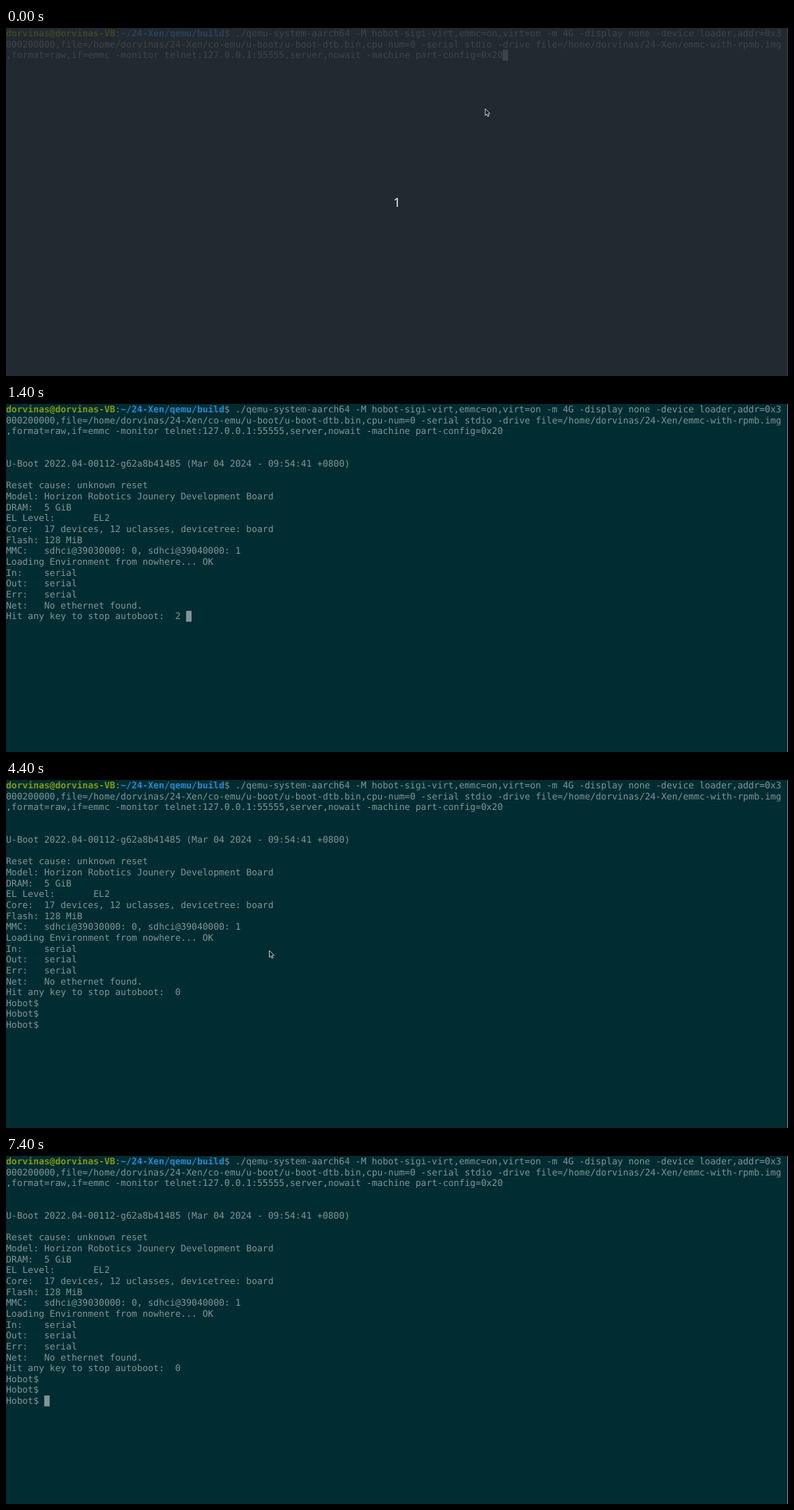
Write an HTML page with a canvas that moves like this. It is 1121 px wide and 500 px high and loops after 8000 ms.

```html
<!DOCTYPE html>
<html lang="en">
<head>
<meta charset="utf-8">
<title>Terminal boot</title>
<style>
html, body { margin: 0; width: 100%; height: 100%; overflow: hidden; background: #012d32; }
canvas { display: block; }
</style>
</head>
<body>
<canvas id="stage" width="1121" height="500"></canvas>
<script>
const ctx = document.getElementById('stage').getContext('2d');
const W = 1121, H = 500, LOOP = 8000;
const CELL = 7.824, ROW = 15.64, BASE = 12;
const BG = '#012d32', FG = '#839496', GREEN = '#859900', BLUE = '#268bd2';
const MONO = '13px "DejaVu Sans Mono", monospace';

const command = [
  [23, 0, ':'],
  [40, 0, '$ ./qemu-system-aarch64 -M hobot-sigi-virt,emmc=on,virt=on -m 4G -display none -device loader,addr=0x3'],
  [0, 1, '000200000,file=/home/dorvinas/24-Xen/co-emu/u-boot/u-boot-dtb.bin,cpu-num=0 -serial stdio -drive file=/home/dorvinas/24-Xen/emmc-with-rpmb.img'],
  [0, 2, ',format=raw,if=emmc -monitor telnet:127.0.0.1:55555,server,nowait -machine part-config=0x20']
];

// Output lines: time shown, column, row, text
const output = [
  [1200, 0, 5, 'U-Boot 2022.04-00112-g62a8b41485 (Mar 04 2024 - 09:54:41 +0800)'],
  [1200, 0, 7, 'Reset cause: unknown reset'],
  [1200, 0, 8, 'Model: Horizon Robotics Jounery Development Board'],
  [1200, 0, 9, 'DRAM:  5 GiB'],
  [1200, 0, 10, 'EL Level:       EL2'],
  [1200, 0, 11, 'Core:  17 devices, 12 uclasses, devicetree: board'],
  [1200, 0, 12, 'Flash:'],
  [1400, 7, 12, '128 MiB'],
  [1400, 0, 13, 'MMC:   sdhci@39030000: 0, sdhci@39040000: 1'],
  [1400, 0, 14, 'Loading Environment from nowhere... OK'],
  [1400, 0, 15, 'In:    serial'],
  [1400, 0, 16, 'Out:   serial'],
  [1400, 0, 17, 'Err:   serial'],
  [1400, 0, 18, 'Net:   No ethernet found.'],
  [1400, 0, 19, 'Hit any key to stop autoboot:'],
  [2100, 0, 20, 'Hobot$'],
  [2200, 0, 21, 'Hobot$'],
  [2200, 0, 22, 'Hobot$']
];

// Text cursor: start time, column, row (no column = hidden)
const cursor = [
  [0, 91, 2], [300], [900, 91, 2], [1100, 0, 3], [1200, 7, 12],
  [1400, 33, 19], [1600], [1900, 33, 19], [2100, 7, 20], [2200, 7, 22],
  [2800], [3500, 7, 22], [4400], [5500, 7, 22], [5600],
  [6200, 7, 22], [6800], [7400, 7, 22]
];

function print(col, row, str, color = FG, weight = '') {
  ctx.font = weight + MONO;
  ctx.fillStyle = color;
  ctx.fillText(str, col * CELL, row * ROW + BASE);
}

function drawCursor(t) {
  const [, col, row] = cursor.filter(c => c[0] <= t).pop();
  if (col === undefined) return;
  ctx.fillStyle = FG;
  ctx.fillRect(col * CELL, row * ROW, CELL, ROW);
}

function pointerAt(t) {
  if (t < 1100) return [687, 116];
  if (t >= 3100 && t < 3200) return [254.5, 288.5];
  if (t >= 3500 && t < 4700) {
    const p = Math.min(1, (Math.floor(t / 100) * 100 - 3500) / 500);
    const e = 1 - (1 - p) ** 2;
    return [308 + 69.5 * e, 321 - 76 * e];
  }
  if (t >= 4700 && t < 4800) return [254.5, 281.5];
  return null;
}

function drawPointer(pos) {
  if (!pos) return;
  const shape = [[0, 0], [0, 9.8], [2.3, 7.9], [3.8, 11.2], [5.3, 10.5], [3.9, 7.2], [6.8, 6.9]];
  ctx.beginPath();
  for (const [x, y] of shape) ctx.lineTo(pos[0] + x, pos[1] + y);
  ctx.closePath();
  ctx.fillStyle = '#10191b';
  ctx.fill();
  ctx.strokeStyle = '#e4e6e3';
  ctx.lineWidth = 0.9;
  ctx.stroke();
}

function drawCountdown() {
  ctx.fillStyle = 'rgba(43, 42, 49, 0.77)';
  ctx.fillRect(0, 0, W, H);
  ctx.font = '18px "Noto Sans", "Open Sans", sans-serif';
  ctx.fillStyle = '#eef0f0';
  ctx.textAlign = 'center';
  ctx.fillText('1', 560.5, 257);
  ctx.textAlign = 'left';
}

function draw(t) {
  ctx.textRendering = 'geometricPrecision';
  ctx.fillStyle = BG;
  ctx.fillRect(0, 0, W, H);
  ctx.fillStyle = '#7d9294';
  ctx.fillRect(1120, 0, 1, H);

  print(0, 0, 'dorvinas@dorvinas-VB', GREEN, 'bold ');
  print(21, 0, '~/24-Xen/qemu/build', BLUE, 'bold ');
  command[0][0] = 20;
  for (const line of command) print(...line);
  for (const [from, ...line] of output) if (t >= from) print(...line);
  if (t >= 1400) print(31, 19, t < 2100 ? '2' : '0');

  drawCursor(t);
  if (t < 100) drawCountdown();
  drawPointer(pointerAt(t));
}

function tick() {
  draw(performance.now() % LOOP);
  requestAnimationFrame(tick);
}
tick();
</script>
</body>
</html>
```
